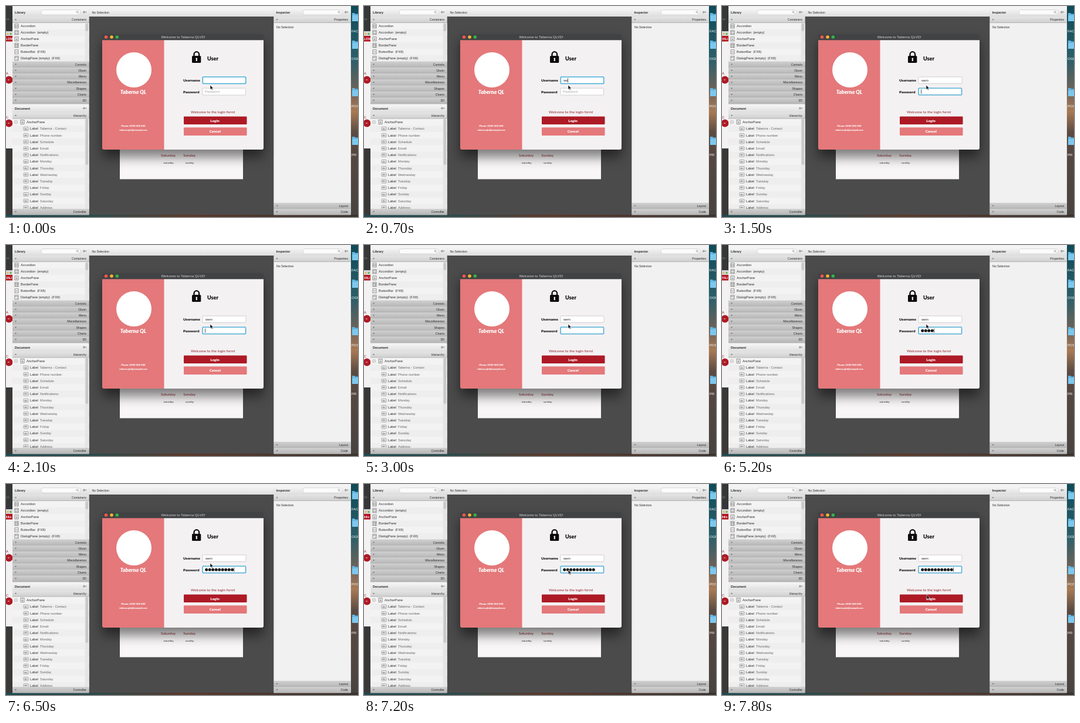
An HTML page that plays this animation: 600 by 360 pixels, repeating every 8000 ms.

```html
<!DOCTYPE html>
<html lang="en">
<head>
<meta charset="utf-8">
<title>Login form</title>
<style>
html, body { margin: 0; width: 100%; height: 100%; overflow: hidden; background: #333; }
svg { display: block; width: 600px; height: 360px; }
text { font-family: "Liberation Sans", Arial, sans-serif; font-size: 5.65px; fill: #2b2b2b; white-space: pre; }
.b { font-weight: 700; font-size: 5.3px; }
.sub { font-size: 5.2px; }
.dim { fill: #666; }
.lato { font-family: Lato, "Open Sans", sans-serif; }
.heavy { font-family: Lato, "Open Sans", sans-serif; font-weight: 900; }
.end { text-anchor: end; }
.mid { text-anchor: middle; }
.w { fill: #fff; }
.red { fill: #8e2529; }
#pointer { animation: glide 8s linear infinite; }
@keyframes glide {
  0%, 86.5% { transform: translate(348px, 135px); animation-timing-function: ease-in-out; }
  97.5%, 100% { transform: translate(349px, 189px); }
}
</style>
</head>
<body>
<svg viewBox="0 0 600 360">
  <defs>
    <linearGradient id="sky" x2="0" y2="1">
      <stop offset="0" stop-color="#0f4a58"/>
      <stop offset=".25" stop-color="#2b5f6a"/>
      <stop offset=".4" stop-color="#6f6258"/>
      <stop offset=".5" stop-color="#a87a55"/>
      <stop offset=".6" stop-color="#5a4a42"/>
      <stop offset="1" stop-color="#484340"/>
    </linearGradient>
    <linearGradient id="ground">
      <stop offset="0" stop-color="#1d4a50"/>
      <stop offset=".25" stop-color="#2c4a4b"/>
      <stop offset=".5" stop-color="#5a3a2c"/>
      <stop offset="1" stop-color="#3a332f"/>
    </linearGradient>
    <linearGradient id="head" x2="0" y2="1">
      <stop offset="0" stop-color="#f6f6f6"/>
      <stop offset="1" stop-color="#dedede"/>
    </linearGradient>
    <linearGradient id="bar" x2="0" y2="1">
      <stop offset="0" stop-color="#d0d0d0"/>
      <stop offset="1" stop-color="#b6b6b6"/>
    </linearGradient>
    <linearGradient id="open" x2="0" y2="1">
      <stop offset="0" stop-color="#e4e4e4"/>
      <stop offset="1" stop-color="#cfcfcf"/>
    </linearGradient>
    <filter id="blur" x="-20%" y="-20%" width="140%" height="140%"><feGaussianBlur stdDeviation="10"/></filter>
    <clipPath id="edge"><rect width="11" height="360"/></clipPath>
  </defs>

  <rect width="600" height="360" fill="#3b3938"/>
  <rect x="586" width="14" height="360" fill="url(#sky)"/>
  <rect y="356" width="600" height="4" fill="url(#ground)"/>
  <g id="desk"></g>

  <g clip-path="url(#edge)">
    <rect width="11" height="43" fill="#363738"/>
    <text x="-3" y="24" style="font-size:5px;fill:#777">Exp</text>
    <rect y="43" width="11" height="8" fill="#d6d6d6"/>
    <circle cx="3" cy="47.5" r="1.6" fill="#f0b23a"/>
    <circle cx="8" cy="47.5" r="1.6" fill="#45b649"/>
    <rect y="51" width="11" height="192" fill="#f3f1f2"/>
    <rect y="51" width="11" height="9.500" fill="#b3151f"/>
    <text id="tag" class="b w" x="0" y="57.5" style="font-size:4.6px"></text>
    <text class="red" x="0" y="117" style="font-size:6px">A</text>
    <circle cx="5" cy="126" r="6.5" fill="#ad1a25"/>
    <text class="red" x="0" y="191.500" style="font-size:6px">C</text>
    <circle cx="5" cy="200" r="6.5" fill="#ad1a25"/>
    <path d="M3 126h3M3 200h3" stroke="#fff" stroke-width=".8"/>
  </g>

  <rect x="11" width="577" height="356" fill="#d9d9d9"/>
  <rect x="11" width="577" height="4" fill="#f3f3f3"/>
  <rect x="141.500" y="18" width="315" height="338" fill="#4b4b4c"/>
  <rect x="141.500" y="4" width="315" height="14" fill="url(#head)"/>
  <text class="sub" x="146.500" y="13">No Selection</text>
  <rect x="456.500" y="29" width="131" height="307" fill="#f1f1f1"/>
  <text class="sub" x="461" y="38">No Selection</text>
  <rect x="11" y="29" width="130.500" height="66" fill="#f3f3f3"/>
  <rect x="11" y="192" width="130.500" height="154" fill="#f3f3f3"/>
  <g id="panels"></g>

  <rect x="194" y="200" width="210" height="95.500" fill="#f8f6f7"/>
  <g class="mid">
    <text class="lato red" x="276.500" y="257.300" style="font-size:6.5px">Saturday</text>
    <text class="lato red" x="312.700" y="257.300" style="font-size:6.5px">Sunday</text>
    <text class="lato" x="277" y="268.500" style="font-size:4.600px">saturday</text>
    <text class="lato" x="313" y="268.500" style="font-size:4.600px">sunday</text>
  </g>

  <rect x="164" y="60" width="275" height="198" rx="5" opacity=".5" filter="url(#blur)"/>
  <path d="M164 59V51q0-3 3-3H436q3 0 3 3V59Z" fill="#414244"/>
  <circle cx="170.5" cy="53" r="2.8" fill="#f2574f"/>
  <circle cx="180" cy="53" r="2.8" fill="#f5b32f"/>
  <circle cx="189.3" cy="53" r="2.8" fill="#35b24a"/>
  <text class="mid" x="302" y="55.3" style="font-size:6.1px;fill:#d4d4d4">Welcome to Taberna QLVD!</text>
  <path d="M164 58.300H270V245H167q-3 0-3-3Z" fill="#e4787a"/>
  <path d="M269.500 58.300H439V242q0 3-3 3H269.500Z" fill="#f4f1f3"/>

  <circle cx="218" cy="109" r="30" fill="#fff"/>
  <g class="mid" font-style="italic">
    <text class="heavy w" x="217" y="150" style="font-size:9px">Taberna QL</text>
    <text class="heavy w" x="217" y="206" style="font-size:4.4px">Phone: 0000 000 000</text>
    <text class="heavy w" x="217" y="212.5" style="font-size:4px">taberna.qlvd@example.com</text>
  </g>

  <path d="M320.5 86V82.5a4.3 4.3 0 0 1 8.6 0V86" fill="none" stroke="#0b0b0b" stroke-width="2.3"/>
  <rect x="317" y="85" width="15.3" height="12" rx="1.6" fill="#0b0b0b"/>
  <path d="M324.8 88.5a1.5 1.5 0 0 1 .8 2.7l.5 2.8h-2.6l.5-2.8a1.5 1.5 0 0 1 .8-2.7Z" fill="#f4f1f3"/>
  <text class="heavy" x="343" y="93" style="font-size:9px;fill:#111">User</text>
  <text class="heavy" x="302" y="129" style="font-size:6.3px;fill:#111">Username</text>
  <text class="heavy" x="302" y="148.7" style="font-size:6.3px;fill:#111">Password</text>
  <g fill="#fff" stroke="#c9c6c8" stroke-width=".8">
    <rect x="335" y="121" width="74" height="11.5" rx="1"/>
    <rect x="335" y="140.200" width="73.5" height="11.800" rx="1"/>
  </g>
  <g id="focus" fill="none">
    <rect x="335.300" y="121" width="73.500" height="11.5" rx="1" stroke="#a9dcf0" stroke-width="1.800"/>
    <rect x="335.300" y="121" width="73.500" height="11.5" rx="1" stroke="#1c94c4" stroke-width="1.1" stroke-dasharray="2 .7"/>
  </g>
  <text id="hint" x="339" y="148.2" style="fill:#a5a5a5">Password</text>
  <text id="name" x="340" y="129"></text>
  <g id="dots" fill="#161616"></g>
  <rect id="caret" width=".8" height="7.5" fill="#333"/>

  <text class="lato red" x="315" y="182.5" style="font-size:6.3px">Welcome to the login form!</text>
  <rect x="303" y="188.5" width="107.500" height="13.5" rx="1" fill="#ad1a25"/>
  <text class="heavy mid w" x="356" y="197.7" style="font-size:6.3px">Login</text>
  <rect x="303" y="207.200" width="107.500" height="13.700" rx="1" fill="#e4787a"/>
  <text class="heavy mid w" x="356.300" y="216.3" style="font-size:6.4px">Cancel</text>

  <path id="pointer" d="M0 0V7.5L1.8 5.9 3 8.6 4.3 8 3.1 5.4H5.5Z" fill="#111" stroke="#fff" stroke-width=".5"/>
</svg>
<script>
const $ = id => document.getElementById(id);
const rect = (x, y, w, h, fill, more = '') =>
  `<rect x="${x}" y="${y}" width="${w}" height="${h}" fill="${fill}" ${more}/>`;
const text = (x, y, s, cls = '') => `<text x="${x}" y="${y}" class="${cls}">${s}</text>`;
const line = (d, col = '#666') => `<path d="${d}" fill="none" stroke="${col}" stroke-width=".7"/>`;

// Panel title with search box and gear
function header(x, w, y, label, search) {
  let s = rect(x, y, w, 14, 'url(#head)') + text(x + 4, y + 8.7, label, 'b');
  if (search) {
    s += rect(search, y + 2.5, 67, 8.5, '#fbfbfb', 'rx="4" stroke="#c4c4c4" stroke-width=".6"') +
      `<circle cx="${search + 61.5}" cy="${y + 6.2}" r="1.4" fill="none" stroke="#777" stroke-width=".6"/>` +
      line(`M${search + 62.5} ${y + 7.3}l1.4 1.4`);
  }
  const g = x + w - 8.5;
  return s + `<circle cx="${g}" cy="${y + 6.5}" r="1.3" fill="none" stroke="#666" stroke-width=".9"/>` +
    `<path d="M${g + 2} ${y + 5.8}h2.400l-1.2 1.600Z" fill="#666"/>`;
}

// Accordion strip with its label at the right
const strip = (x, w, mid, label, isOpen) =>
  rect(x, mid - 5.2, w, 10.4, isOpen ? 'url(#open)' : 'url(#bar)') +
  line(`M${x} ${mid + 5}h${w}`, '#a8a8a8') +
  `<path d="M${x + 4} ${mid - 1}h3l-1.5 2Z" fill="#666"/>` + text(x + w - 4.5, mid + 1.8, label, 'sub end');

const scrollbar = (y, h, thumb) =>
  rect(134.5, y, 7, h, '#e6e6e6') + rect(135.5, y + 1, 4.5, thumb, '#c9c9c9', 'rx="2"');

function paneIcon(x, y, kind) {
  const d = ['M0 2.5h6M0 4.5h6', 'M0 2h6M0 5h6', 'M3 1.5v4M1.5 4q1.5 2 3 0', 'M0 2h6M2 2v5M4.5 2v5',
    'M1 3.5h4', 'M0 2h6M3 5h2'][kind];
  return `<g transform="translate(${x} ${y - 3.5})">` +
    rect(0, 0, 6, 7, '#f3f3f3', 'stroke="#666" stroke-width=".7"') + line(d) + '</g>';
}

const LEFT = [11, 130.5], RIGHT = [456.5, 131];
let ui = header(...LEFT, 4, 'Library', 60) + header(...LEFT, 168, 'Document') + header(...RIGHT, 4, 'Inspector', 506);

['Accordion', 'Accordion  (empty)', 'AnchorPane', 'BorderPane', 'ButtonBar  (FX8)', 'DialogPane (empty)  (FX8)']
  .forEach((s, i) => {
    const y = 34.3 + i * 11;
    if (i % 2) ui += rect(11, y - 5.5, 130.5, 11, '#eeeeee');
    ui += paneIcon(15, y, i) + text(25, y + 2, s);
  });

ui += rect(14.5, 195.5, 5, 5, '#f8f8f8', 'rx="1" stroke="#999" stroke-width=".6"') + line('M15.7 198h2.6') +
  paneIcon(25, 198, 2) + text(35, 200, 'AnchorPane');
['Taberna - Contact', 'Phone number:', 'Schedule', 'Email:', 'Notifications:', 'Monday', 'Thursday',
  'Wednesday', 'Tuesday', 'Friday', 'Sunday', 'Saturday', 'Address:'].forEach((s, i) => {
    const y = 209.4 + i * 11.2;
    if (i % 2 === 0) ui += rect(11, y - 5.6, 130.5, 11.2, '#eeeeee');
    ui += rect(30, y - 3, 8, 6, '#eee', 'rx="1" stroke="#777" stroke-width=".6"') +
      `<text x="34" y="${y + 1.2}" class="mid" style="font-size:3px">abc</text>` +
      text(41, y + 2, 'Label') + text(58, y + 2, s, 'dim');
  });

ui += scrollbar(29, 66, 13) + scrollbar(192, 154, 78);
ui += strip(...LEFT, 23.5, 'Containers', true) + strip(...LEFT, 187, 'Hierarchy', true) +
  strip(...RIGHT, 23.5, 'Properties', true) + strip(...RIGHT, 341, 'Layout') +
  strip(...RIGHT, 351.3, 'Code') + strip(...LEFT, 351.3, 'Controller');
['Controls', 'Gluon', 'Menu', 'Miscellaneous', 'Shapes', 'Charts', '3D']
  .forEach((s, i) => ui += strip(...LEFT, 99.7 + i * 10.25, s));
$('panels').innerHTML = ui;

$('desk').innerHTML = [[17, 'FACE'], [64, 'OGRA'], [145, 'POS'], [228, 'PR']].map(([y, s]) =>
  `<path d="M590 ${y - 5}h4l1.5 1.5H602V${y + 9}H590Z" fill="#63b7e3"/>` + rect(590, y - 1, 12, 10, '#7cc8ee') +
  `<text x="589" y="${y + 28}" class="w" style="font-size:6px">${s}</text>`).join('');

$('dots').innerHTML = Array.from({ length: 10 }, (_, i) =>
  `<circle cx="${341.7 + i * 5.5}" cy="146.2" r="2.5"/>`).join('');
const dots = [...$('dots').children];

const LOOP = 8000, FOCUS = 1200;
const nameKeys = [200, 700, 1000];
const passKeys = [3900, 4700, 4900, 5100, 5500, 5700, 5900, 6100, 6500, 6700];
const nameEnds = [0, 4.1, 7.2, 12];
const blinkOff = [[0, 100], [1800, 2100], [2600, 3100], [3600, 3900], [7200, 7700]];
const tags = [[6000, 'Inks'], [3300, 'YALI'], [1000, 'VALI'], [0, 'LONC']];
const show = (el, on) => el.setAttribute('visibility', on ? 'visible' : 'hidden');

function draw(t) {
  const typed = keys => keys.filter(k => t >= k).length;
  const n = typed(nameKeys), p = typed(passKeys), pass = t >= FOCUS;
  $('name').textContent = 'wem'.slice(0, n);
  dots.forEach((d, i) => show(d, i < p));
  show($('hint'), !pass);
  $('focus').setAttribute('transform', pass ? 'translate(-.2 19.2)' : '');
  $('caret').setAttribute('x', pass ? 339 + p * 5.5 : 340 + nameEnds[n]);
  $('caret').setAttribute('y', pass ? 142.3 : 123);
  show($('caret'), !blinkOff.some(([a, b]) => t >= a && t < b));
  $('tag').textContent = tags.find(([at]) => t >= at)[1];
}

const pointer = $('pointer').getAnimations()[0];
function tick() {
  const t = performance.now() % LOOP;
  if (pointer) pointer.currentTime = t;
  draw(t);
  requestAnimationFrame(tick);
}
tick();
</script>
</body>
</html>
```
